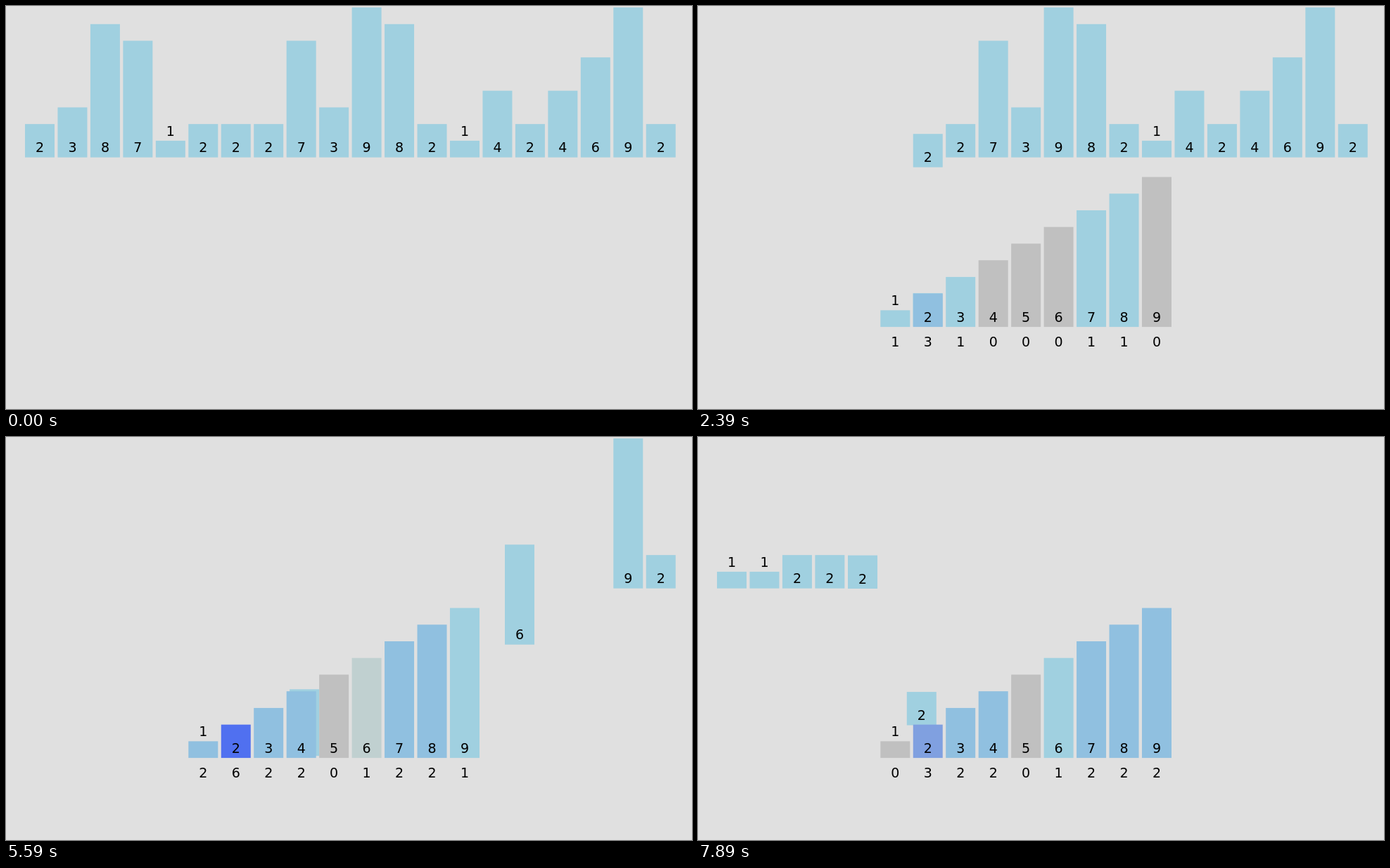
An HTML page with a canvas that plays this animation: 975x574 px, repeating every 7.99 s.

```html
<!DOCTYPE html>
<html lang="en">
<head>
<meta charset="utf-8">
<title>Counting sort</title>
<style>
  html, body { margin: 0; width: 100%; height: 100%; overflow: hidden; background: #e0e0e0; }
  canvas { display: block; }
</style>
</head>
<body>
<canvas id="stage" width="975" height="574"></canvas>
<script>
const ctx = document.getElementById('stage').getContext('2d');

const LOOP = 7990, DURATION = 500, SLOTS_START = 455;
const UNIT = 23.73, BAR_WIDTH = 42, TOP_BASE = 215.6, SLOT_BASE = 457.1;
const LIGHT_BLUE = '#a0d0e0';

const input = [...'23871222739821424692'].map(Number);
const output = [...input].sort().slice(0, 6);

// Moves follow each other evenly between these [move, start time] points.
const tempo = [
  [0, 485], [1, 895], [5, 1935], [6, 2268], [9, 2958],
  [10, 3345], [16, 5162], [17, 5372], [22, 6866], [25, 7708]
];

const lerp = (a, b, p) => a + (b - a) * p;

function startTime(move) {
  const next = Math.max(1, tempo.findIndex(([index]) => index >= move));
  const [i0, t0] = tempo[next - 1], [i1, t1] = tempo[next];
  return lerp(t0, t1, (move - i0) / (i1 - i0));
}

const columnX = i => 27 + 46.46 * i;
const topPlace = i => ({ x: columnX(i), base: TOP_BASE });
const slotPlace = v => ({ x: columnX(v + 4), base: SLOT_BASE });

// Every bar first drops into its slot, then bars return in sorted order.
const moves = [
  ...input.map((value, i) => ({ value, from: topPlace(i), to: slotPlace(value), change: 1 })),
  ...output.map((value, i) => ({ value, from: slotPlace(value), to: topPlace(i), change: -1 }))
].map((move, i) => ({ ...move, start: startTime(i) }));

function progress(start, time) {
  const t = Math.min(1, Math.max(0, (time - start) / DURATION));
  return t < 0.5 ? 4 * t ** 3 : 1 - 4 * (1 - t) ** 3;
}

// Slots turn from grey to deeper blue as they fill, in coarse colour steps.
const countColor = n => n ? [182 - 15.9 * n, 235.2 - 21.2 * n, 220 + 2 * n] : [192, 192, 192];
const coarse = v => 16 * Math.floor((v + 9) / 16);

function drawText(text, x, baseline) {
  ctx.fillStyle = '#000';
  ctx.fillText(text, x + BAR_WIDTH / 2, Math.round(baseline));
}

function drawLabel(value, x, base) {
  drawText(value, x, base - 7.2 - (value === 1 ? UNIT : 0));
}

function drawBar(value, x, base, color, grown = 1) {
  const height = value * UNIT;
  ctx.fillStyle = color;
  ctx.fillRect(x, base - height, BAR_WIDTH, height * grown);
}

function drawMove({ value, from, to, start, change }, time) {
  const p = progress(start, time);
  const entering = change > 0;
  if (entering ? p === 1 : time < start) return;
  const x = lerp(from.x, to.x, p);
  const base = lerp(from.base, to.base, p);
  drawBar(value, x, base, LIGHT_BLUE);
  drawLabel(value, x, base);
}

function drawSlot(value, time) {
  const { x, base } = slotPlace(value);
  const past = moves.filter(m => m.value === value && m.start <= time);
  const count = past.reduce((sum, m) => sum + m.change, 0);
  const last = past[past.length - 1];
  let rgb = countColor(count);
  if (last) {
    const before = countColor(count - last.change);
    const p = progress(last.start, time);
    rgb = rgb.map((v, i) => lerp(before[i], v, p));
  }
  drawBar(value, x, base, `rgb(${rgb.map(coarse)})`, progress(SLOTS_START, time));
  drawLabel(value, x, base);
  drawText(count, x, 485);
}

// The picture steps every 100 ms after one longer pause.
function steppedTime(t) {
  if (t < 100) return 0;
  if (t < 590) return 100;
  return 590 + Math.floor((t - 590) / 100) * 100;
}

function draw(now) {
  const time = steppedTime(now % LOOP);
  ctx.fillStyle = '#e0e0e0';
  ctx.fillRect(0, 0, 975, 574);
  ctx.font = '19px "DejaVu Sans", sans-serif';
  ctx.textAlign = 'center';
  moves.forEach(move => drawMove(move, time));
  if (time >= 100) for (let v = 1; v <= 9; v++) drawSlot(v, time);
}

const origin = performance.now();
function tick() {
  draw(performance.now() - origin);
  requestAnimationFrame(tick);
}
tick();
</script>
</body>
</html>
```
